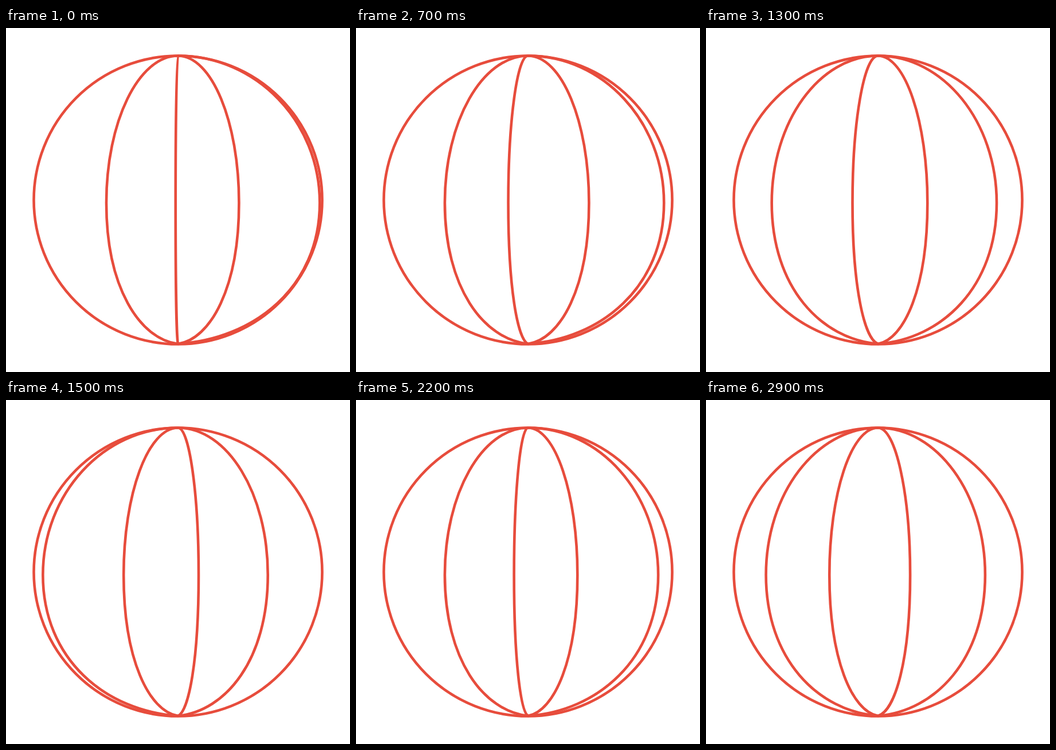
Animation, 600 px wide and 600 px high, one loop 3 s. Source, as an HTML page:

```html
<!DOCTYPE html>
<html lang="en">
<head>
<meta charset="utf-8">
<title>Turning globe</title>
<style>
  html, body { margin: 0; width: 100%; height: 100%; overflow: hidden; background: #fff; }
  svg { display: block; width: 100vw; height: 100vh; fill: none; stroke: #e74c3c; stroke-width: 4.6; }
</style>
</head>
<body>
<svg viewBox="0 0 600 600">
  <circle cx="300" cy="300" r="251.5"/>
  <path/><path/><path/><path/>
</svg>
<script>
  const LOOP = 3000, FRAME = 100;
  const SLOTS = 50, STEP = 10.06, LEFT = 54.3;
  const CX = 300, TOP = 48.5, MID = 305, BOTTOM = 551;
  const STARTS = [15, 27, 38, 52];
  const lines = document.querySelectorAll('path');

  // Meridian through the poles: rounded at the top, slightly pointed below.
  function meridian(x) {
    const w = x - CX, up = MID - TOP, down = BOTTOM - MID;
    return `M${CX} ${TOP}` +
      `C${CX + w * 0.552} ${TOP} ${x} ${MID - up * 0.552} ${x} ${MID}` +
      `C${x} ${MID + down * 0.6} ${CX + w * 0.535} ${BOTTOM - 8.5} ${CX} ${BOTTOM}`;
  }

  // Slots travelled: 25 per second, with a short hold at the start.
  const travel = n => n < 2 ? 3 + n : Math.floor(n * 2.5);

  function render(time) {
    const moved = travel(Math.floor((time % LOOP) / FRAME));
    STARTS.forEach((start, i) => {
      const slot = (start - moved + 2 * SLOTS) % SLOTS;
      lines[i].setAttribute('d', meridian(LEFT + slot * STEP));
    });
  }

  const begin = performance.now();
  function tick() {
    render(performance.now() - begin);
    requestAnimationFrame(tick);
  }
  tick();
</script>
</body>
</html>
```
